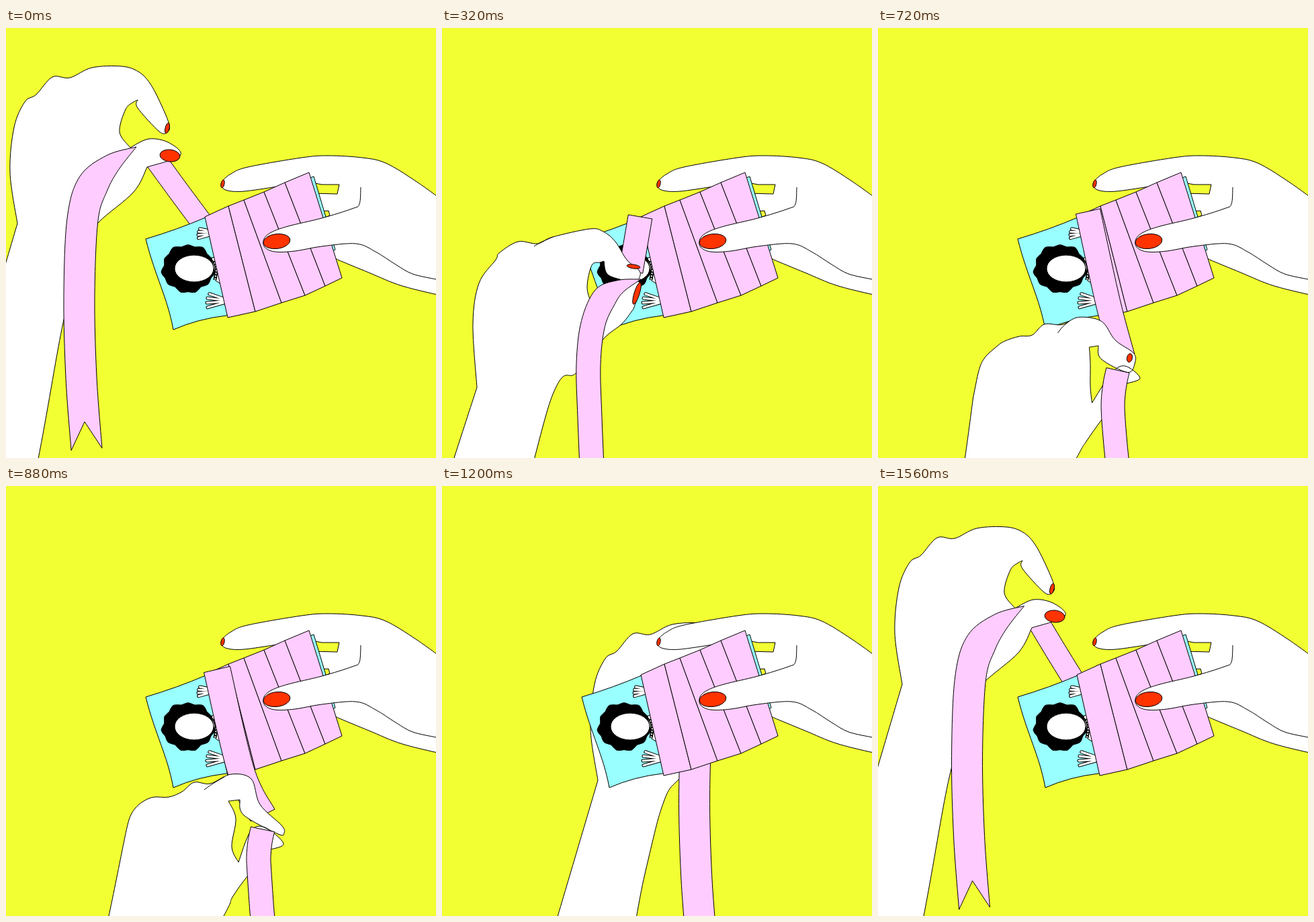
An HTML page with a canvas for the animation above (1.6 s loop, 640x640 px).

```html
<!DOCTYPE html>
<html lang="en">
<head>
<meta charset="utf-8">
<title>Wrapping</title>
<style>
  html, body { margin: 0; width: 100%; height: 100%; overflow: hidden; background: #f2ff33; }
  canvas { display: block; width: 640px; height: 640px; }
</style>
</head>
<body>
<canvas id="stage" width="640" height="640"></canvas>
<script>
const ctx = document.getElementById('stage').getContext('2d');
const YELLOW = '#f2ff33', PINK = '#ffccff', CYAN = '#99ffff', RED = '#ff3300';
const LOOP = 1600, STEP = 40;

// Poses of the moving hand. Lists hold x, y pairs that match between poses.
// tail and strip are centre lines; size is [tail half width, tail taper length, strip half width];
// nails are ellipses [x, y, rx, ry, angle].
const lifted = {
  hand: [-128,780, -43,494, 17,291, 6,215, 12,148, 28,110, 45,99, 69,73, 95,74, 128,59, 172,57,
    197,65, 214,82, 230,112, 243,144, 240,155, 228,154, 196,119, 196,107, 190,110, 178,121, 169,155,
    185,178, 213,165, 243,171, 259,190, 210,207, 190,244, 138,289, 115,323, 87,430, 5,790],
  tail: [194,177, 159,200, 130,232, 114,285, 109,400, 112,520, 120,627],
  strip: [222,195, 257,243, 292,290],
  size: [23, 70, 16],
  nail: [240,149, 3,8, 0.25],
  thumb: [244,190, 15,9, 0.1],
  crease: [172,57, 172,57, 172,57]
};
const over = {
  hand: [-30,790, 18,640, 52,535, 46,440, 55,380, 80,345, 85,335, 113,318, 142,321, 165,311, 220,299,
    240,303, 258,318, 275,345, 291,358, 295,368, 285,377, 248,368, 241,347, 235,349, 223,353, 216,385,
    222,410, 270,385, 287,376, 296,385, 285,418, 268,440, 240,463, 200,513, 165,545, 85,790],
  tail: [296,374, 266,384, 243,400, 225,440, 218,500, 220,580, 225,700],
  strip: [295,281, 288,322, 281,362],
  size: [18, 60, 18],
  nail: [285,355, 10,3, 0.15],
  thumb: [290,395, 4,17, 0.3],
  crease: [137,325, 147,319, 165,311]
};
const pulled = {
  hand: [95,790, 106,640, 108,570, 118,520, 127,500, 145,482, 155,470, 178,455, 197,459, 215,441, 244,440,
    262,432, 300,437, 328,455, 350,462, 351,480, 338,507, 310,495, 308,479, 298,481, 290,504, 296,530,
    291,556, 330,515, 350,498, 367,510, 343,518, 325,560, 306,586, 282,620, 267,640, 190,790],
  tail: [332,508, 328,525, 324,550, 323,575, 327,620, 332,660, 340,730],
  strip: [311,273, 334,390, 346,490],
  size: [17, 1, 17],
  nail: [341,468, 8,13, 0.4],
  thumb: [363,510, 0,0, 0],
  crease: [240,456, 241,447, 244,440]
};
const tucked = {
  hand: [120,790, 153,640, 175,532, 183,497, 192,480, 205,469, 220,463, 242,463, 262,455, 280,441, 304,443,
    335,429, 365,436, 378,474, 410,505, 414,516, 405,518, 354,490, 348,467, 331,469, 342,495, 336,537,
    346,560, 364,514, 385,508, 413,532, 394,541, 385,555, 360,580, 337,612, 324,640, 240,790],
  tail: [382,511, 378,530, 376,552, 377,575, 380,620, 383,660, 387,730],
  strip: [314,273, 350,425, 382,490],
  size: [18, 1, 20],
  nail: [408,514, 0,0, 0],
  thumb: [408,530, 0,0, 0],
  crease: [295,452, 308,443, 325,433]
};

// The lifted pose carried elsewhere; the hanging ribbon swings wider than the hand.
function carried(dx, dy) {
  const move = (part, x, y, count = 99) =>
    lifted[part].map((v, i) => i >= count ? v : v + (i % 2 ? y : x));
  return {
    hand: move('hand', dx, dy),
    tail: move('tail', dx * 1.24, dy * 0.4),
    strip: [222 + dx * 0.77, 195 + dy, 257 + dx * 0.38, 243 + dy / 2, 292, 290],
    size: lifted.size,
    nail: move('nail', dx, dy, 2),
    thumb: move('thumb', dx, dy, 2),
    crease: move('crease', dx, dy)
  };
}

const behind = carried(215, 147);
const keys = [[0, lifted], [40, lifted], [320, over], [560, pulled], [880, tucked], [1200, behind],
  [1240, behind], [1360, carried(69, 17)], [1560, carried(19, 4)], [1600, lifted]];

function poseAt(t) {
  const next = keys.findIndex(key => key[0] > t);
  const [t0, a] = keys[next - 1], [t1, b] = keys[next];
  const k = (t - t0) / (t1 - t0), pose = {};
  for (const part in a) pose[part] = a[part].map((v, i) => v + (b[part][i] - v) * k);
  return pose;
}

function pairs(list) {
  const points = [];
  for (let i = 0; i < list.length; i += 2) points.push([list[i], list[i + 1]]);
  return points;
}

// Smooth curve through the points; indices in `sharp` become corners.
function trace(points, closed, sharp = []) {
  const p = points.flatMap((point, i) => sharp.includes(i) ? [point, point] : [point]);
  const n = p.length;
  const at = i => closed ? p[(i + n) % n] : p[Math.max(0, Math.min(n - 1, i))];
  ctx.beginPath();
  ctx.moveTo(...p[0]);
  for (let i = 0; i < (closed ? n : n - 1); i++) {
    const [a, b, c, d] = [at(i - 1), at(i), at(i + 1), at(i + 2)];
    if (b === c) continue;
    ctx.bezierCurveTo(b[0] + (c[0] - a[0]) / 6, b[1] + (c[1] - a[1]) / 6,
      c[0] - (d[0] - b[0]) / 6, c[1] - (d[1] - b[1]) / 6, ...c);
  }
}

function paint(fill) {
  ctx.fillStyle = fill;
  ctx.fill();
  ctx.stroke();
}

function blob(list, fill, sharp) {
  trace(pairs(list), true, sharp);
  paint(fill);
}

function polygon(list, fill) {
  ctx.beginPath();
  pairs(list).forEach(point => ctx.lineTo(...point));
  ctx.closePath();
  paint(fill);
}

function line(list) {
  trace(pairs(list), false);
  ctx.stroke();
}

function ellipse([x, y, rx, ry, angle], fill) {
  if (rx < 1) return;
  ctx.beginPath();
  ctx.ellipse(x, y, rx, ry, angle, 0, Math.PI * 2);
  paint(fill);
}

// Band of constant width along a centre line, tapered at its start, with an optional swallowtail.
function ribbon(list, half, taper, notch) {
  const mid = pairs(list), left = [], right = [];
  let length = 0;
  mid.forEach(([x, y], i) => {
    const a = mid[Math.max(0, i - 1)], b = mid[Math.min(mid.length - 1, i + 1)];
    const dx = b[0] - a[0], dy = b[1] - a[1], d = Math.hypot(dx, dy);
    if (i) length += Math.hypot(x - a[0], y - a[1]);
    const w = half * (taper > 2 ? Math.min(1, length / taper) : 1) / d;
    left.push([x + dy * w, y - dx * w]);
    right.unshift([x - dy * w, y + dx * w]);
  });
  const n = mid.length, [x, y] = mid[n - 1];
  const end = notch ? [[x - 3, y - 41]] : [];
  const sharp = [0, n - 1, n, n + end.length, 2 * n - 1 + end.length];
  trace([...left, ...end, ...right], true, sharp);
  paint(PINK);
}

function drawMovingHand(pose) {
  const [half, taper, stripHalf] = pose.size;
  ribbon(pose.strip, stripHalf, 0, false);
  blob(pose.hand, '#fff', [2, 18, 19, 22, 26]);
  ribbon(pose.tail, half, taper, true);
  ellipse(pose.nail, RED);
  ellipse(pose.thumb, RED);
  line(pose.crease);
}

function drawHoldingHand() {
  blob([660,264, 610,228, 565,201, 530,193, 480,190, 440,193, 360,207, 335,217, 322,228, 321,236,
    330,242, 355,243, 410,235, 470,325, 494,345, 540,364, 590,384, 660,401], '#fff', [0, 12, 14, 17]);
  ellipse([322.5, 232, 2.5, 6, 0.2], RED);
  polygon([450,229, 470,233, 496,233, 493,247, 455,246], YELLOW);
  polygon([466,273, 480,272, 482,279, 470,284], YELLOW);
}

function drawOpenHand(x, y, length) {
  for (const [width, color] of [[5, '#000'], [3, '#fff']]) {
    ctx.beginPath();
    for (let i = 0; i < 4; i++) {
      const angle = Math.PI + (i - 1) * 0.28;
      ctx.moveTo(x, y - i * 2);
      ctx.lineTo(x + Math.cos(angle) * length, y + Math.sin(angle) * length);
    }
    ctx.lineWidth = width;
    ctx.strokeStyle = color;
    ctx.stroke();
  }
}

function drawPortrait() {
  ctx.save();
  ctx.lineCap = 'round';
  drawOpenHand(303, 308, 17);
  drawOpenHand(324, 409, 25);
  ctx.restore();
  polygon([306,342, 318,340, 326,385, 312,376], '#fff');
  const hair = [];
  for (let i = 0; i < 44; i++) {
    const a = i / 44 * Math.PI * 2, r = 1 + 0.04 * Math.sin(a * 11) + 0.03 * Math.sin(a * 5);
    hair.push(271 + 38 * r * Math.cos(a), 358 + 35 * r * Math.sin(a));
  }
  blob(hair, '#000');
  ellipse([280, 358, 29, 20, 0], '#fff');
  ctx.save();
  for (const [width, color, dash] of [[5, '#000', []], [2, '#fff', [2, 2]]]) {
    ctx.lineWidth = width;
    ctx.strokeStyle = color;
    ctx.setLineDash(dash);
    line([309,345, 313,358, 311,375]);
  }
  ctx.restore();
}

function drawPacket() {
  ctx.beginPath();
  ctx.moveTo(208, 314);
  ctx.quadraticCurveTo(255, 300, 297, 282);
  ctx.lineTo(458, 221);
  ctx.lineTo(476, 281);
  ctx.lineTo(490, 330);
  ctx.lineTo(328, 428);
  ctx.quadraticCurveTo(285, 433, 249, 449);
  ctx.bezierCurveTo(240, 400, 222, 370, 208, 314);
  paint(CYAN);
  drawPortrait();
  const top = pairs([296,281, 331,265, 354,256, 384,244, 415,230, 451,215]);
  const bottom = pairs([330,431, 371,422, 410,409, 445,398, 475,384, 500,372]);
  for (let i = 0; i < 5; i++) {
    polygon([top[i], top[i + 1], bottom[i + 1], bottom[i]].flat(), PINK);
  }
}

function drawHoldingThumb() {
  const edge = pairs([528,237, 526,262, 515,269, 470,283, 420,295, 395,304, 384,314, 385,326, 400,333,
    430,332, 470,325, 521,321, 550,333, 580,352, 605,366, 640,374]);
  trace(edge, false);
  ctx.lineTo(640, 252);
  ctx.fillStyle = '#fff';
  ctx.fill();
  trace(edge, false);
  ctx.stroke();
  ellipse([403, 317.5, 20, 11, -0.12], RED);
}

function draw(now) {
  const t = Math.floor(now % LOOP / STEP) * STEP;
  const pose = poseAt(t), inFront = t >= 200 && t < 960;
  ctx.fillStyle = YELLOW;
  ctx.fillRect(0, 0, 640, 640);
  ctx.strokeStyle = '#000';
  ctx.lineWidth = 1;
  ctx.lineJoin = 'round';
  if (!inFront) drawMovingHand(pose);
  drawHoldingHand();
  drawPacket();
  drawHoldingThumb();
  if (inFront) drawMovingHand(pose);
}

const start = performance.now();
function tick() {
  draw(performance.now() - start);
  requestAnimationFrame(tick);
}
tick();
</script>
</body>
</html>
```
